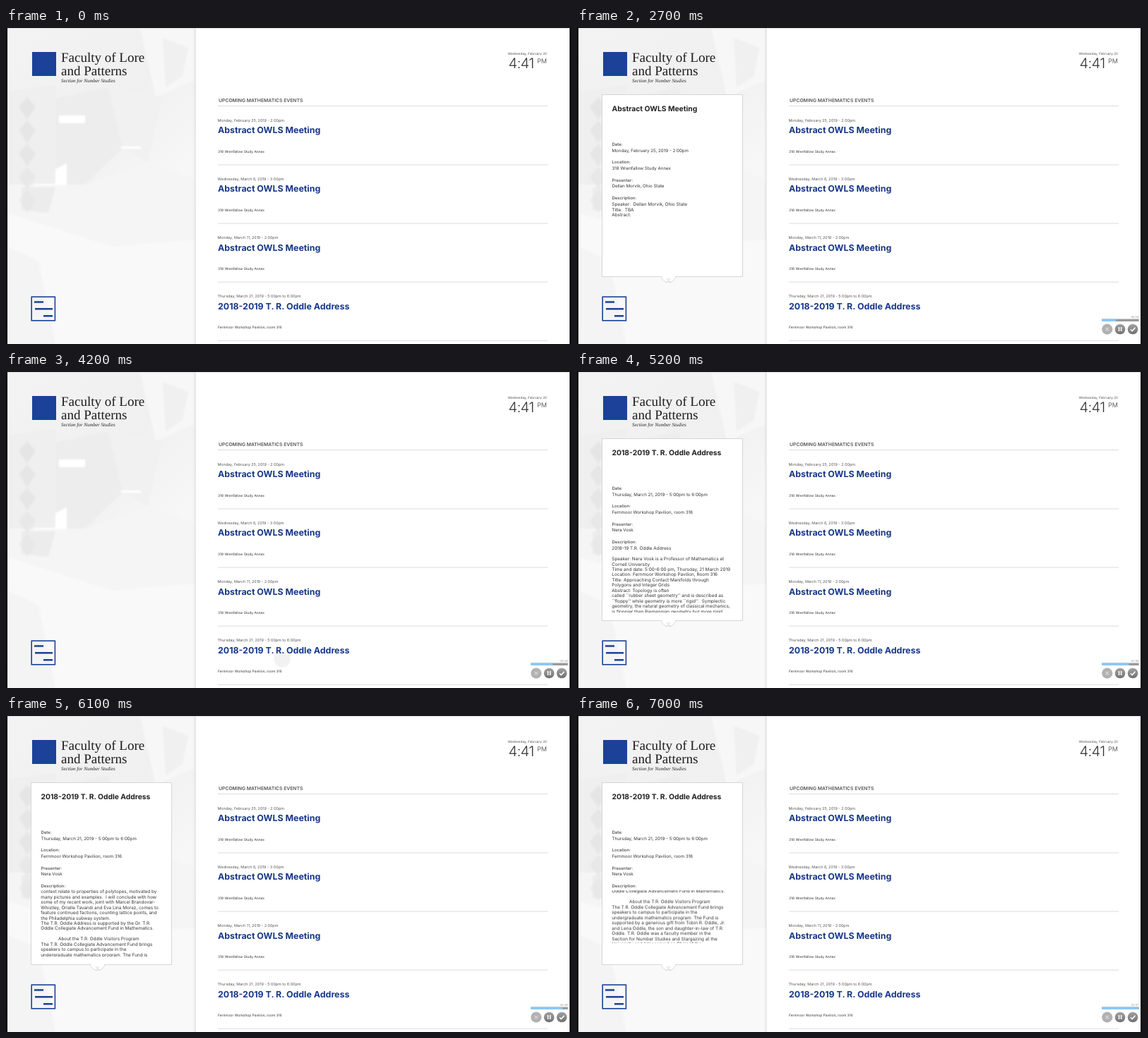
An HTML page for the animation above (7100 ms loop, 800 px wide and 448 px high).

```html
<!DOCTYPE html>
<html lang="en">
<head>
<meta charset="utf-8">
<title>Events board</title>
<style>
html, body { margin: 0; width: 100%; height: 100%; overflow: hidden; background: #000; }
svg { display: block; width: 100vw; height: 100vh; }
text { font-family: Inter, "Open Sans", sans-serif; white-space: pre; fill: #333; text-rendering: geometricPrecision; }
.brand { font: 19px "Liberation Serif", serif; fill: #1d1d1d; }
.unit { font: italic 7px "Liberation Serif", serif; fill: #222; }
.date { font-size: 5.4px; fill: #555; }
.event { font-size: 12.4px; font-weight: 700; fill: #16388a; }
.place { font-size: 4.9px; }
.head { font-size: 10.3px; font-weight: 700; fill: #222; }
.label { font-size: 6px; font-weight: 500; fill: #444; }
.value { font-size: 6.2px; }
.body { font-size: 6.4px; }

.card, .scroll, .fill, .secs, .controls, .tap { animation: 7100ms linear infinite; }
.first { animation-name: first; }
.second { animation-name: second; }
.scroll { animation-name: scroll; }
.fill { animation-name: fill; transform-origin: 743px 0; }
.secs { animation-name: secs; animation-timing-function: step-end; }
.controls { animation-name: controls; animation-timing-function: step-end; }
.tap { animation-name: tap; }
.card { animation-timing-function: cubic-bezier(.37, 0, .63, 1); }

@keyframes first {
  0%, 15.35% { transform: translateX(233px); }
  21%, 42.25% { transform: none; }
  47.89%, 100% { transform: translateX(233px); }
}
@keyframes second {
  0%, 61.97% { transform: translateX(233px); }
  67.6%, 100% { transform: none; }
}
@keyframes scroll {
  0%, 74.6% { transform: translateY(0); animation-timing-function: ease-out; }
  84.5%, 87.3% { transform: translateY(-135.1px); animation-timing-function: ease-out; }
  97.2%, 100% { transform: translateY(-187.7px); }
}
@keyframes fill { from { transform: scaleX(0); } to { transform: scaleX(1); } }
@keyframes secs {
  0% { transform: none; }
  14.085% { transform: translateY(-10px); }
  28.169% { transform: translateY(-20px); }
  42.254% { transform: translateY(-30px); }
  56.338% { transform: translateY(-40px); }
  70.423% { transform: translateY(-50px); }
  84.507% { transform: translateY(-60px); }
  98.592%, 100% { transform: translateY(-70px); }
}
@keyframes controls { 0% { opacity: 0; } 1.408%, 100% { opacity: 1; } }
@keyframes tap {
  0%, 57% { opacity: 0; }
  58.5%, 60% { opacity: 1; }
  62%, 100% { opacity: 0; }
}
</style>
</head>
<body>
<svg viewBox="0 0 800 448" preserveAspectRatio="none">
  <defs>
    <linearGradient id="wall" x2=".6" y2="1">
      <stop offset="0" stop-color="#f3f3f3"/>
      <stop offset=".45" stop-color="#f0f0f0"/>
      <stop offset=".75" stop-color="#f7f7f7"/>
      <stop offset="1" stop-color="#f6f6f6"/>
    </linearGradient>
    <linearGradient id="edge">
      <stop offset="0" stop-color="#000" stop-opacity="0"/>
      <stop offset="1" stop-color="#000" stop-opacity=".04"/>
    </linearGradient>
    <linearGradient id="knob" x2="0" y2="1">
      <stop offset="0" stop-color="#a2a2a2"/>
      <stop offset="1" stop-color="#707070"/>
    </linearGradient>
    <filter id="soft"><feGaussianBlur stdDeviation="1"/></filter>
    <clipPath id="left"><rect x="2" width="266" height="448"/></clipPath>
    <clipPath id="view"><rect x="40" y="246.3" width="190" height="94.7"/></clipPath>
    <clipPath id="sheet"><rect x="40" y="240" width="190" height="269.7"/></clipPath>
    <clipPath id="tick"><rect x="780" y="405" width="18" height="6.5"/></clipPath>
  </defs>

  <rect x="2" width="796" height="448" fill="#fff"/>
  <g clip-path="url(#left)">
    <rect x="2" width="266" height="448" fill="url(#wall)"/>
    <g filter="url(#soft)">
      <path d="M2 90L70 80V222H2Z" fill="#efefef"/>
      <path d="M70 100L145 84 165 170 112 222H70Z" fill="#ededed"/>
      <path d="M145 84L222 96 200 190 165 170Z" fill="#f1f1f1"/>
      <path d="M190 0H268V74L212 98Z" fill="#f7f7f7"/>
      <path d="M222 14L258 28 250 68 226 84Z" fill="#f0f0f0"/>
      <path d="M2 222H112L200 190 268 214V300L150 310 2 262Z" fill="#f5f5f5"/>
      <path d="M2 262L150 310 268 300V448H2Z" fill="#f9f9f9"/>
      <path d="M22 226H70L60 262 22 258Z" fill="#ececec"/>
      <path d="M2 310L46 330 70 448H2Z" fill="#f4f4f4"/>
      <path d="M75 124H112V135H75ZM163 168H191V171H163ZM40 221H86V223H40ZM70 200L86 192V221H70Z" fill="#fff"/>
      <g id="gems" fill="#e3e3e3"/>
    </g>
    <rect x="2" width="266" height="1" fill="#dcdcdc"/>
  </g>

  <rect x="37" y="34" width="34" height="34" fill="#1b4298"/>
  <text class="brand" x="78" y="47.5">Faculty of Lore</text>
  <text class="brand" x="78" y="66.5">and Patterns</text>
  <text class="unit" x="78" y="76.5">Section for Number Studies</text>

  <g fill="none" stroke="#1b4298">
    <rect x="36.2" y="381.2" width="33.2" height="33.6" stroke-width="1.6"/>
    <path d="M40 388.5H53M41 398.3H66M53 408.3H66" stroke-width="2.4"/>
  </g>

  <g clip-path="url(#left)">
    <g id="first" class="card first"></g>
    <g id="second" class="card second"></g>
  </g>

  <rect x="264" width="4" height="448" fill="url(#edge)"/>
  <rect x="268" width="530" height="448" fill="#fff"/>
  <rect x="267.5" width="1" height="448" fill="#d9d9d9"/>
  <rect x="268" width="530" height="1" fill="#e4e4e4"/>
  <circle class="tap" cx="391" cy="407" r="11.5" fill="#f2f2f2"/>
  <g id="events"></g>

  <text x="766" y="38.3" font-size="4.7" text-anchor="end" style="fill:#555">Wednesday, February 20</text>
  <text x="711.5" y="57" font-size="20" font-weight="300" letter-spacing="-.6">4:41</text>
  <text x="752" y="49.5" font-size="9" font-weight="300">PM</text>

  <g class="controls">
    <rect x="743" y="412.5" width="52.5" height="3.5" fill="#9b9b9b"/>
    <rect class="fill" x="743" y="412.5" width="52.5" height="3.5" fill="#8cc8f2"/>
    <g clip-path="url(#tick)"><g id="secs" class="secs"></g></g>
    <circle cx="750.7" cy="427" r="7.6" fill="#b1b1b1"/>
    <circle cx="769" cy="427" r="7.3" fill="url(#knob)"/>
    <circle cx="787" cy="427" r="7.3" fill="url(#knob)"/>
    <g fill="none" stroke="#fff" stroke-width="1.6">
      <path d="M748.4 424.7L753 429.3M753 424.7L748.4 429.3" stroke="#d2d2d2"/>
      <path d="M767.4 424V430M770.6 424V430"/>
      <path d="M783.8 427.2L786.1 429.5 790.4 424.7"/>
    </g>
  </g>

  <path d="M0 0H2V448H0ZM798 0H800V448H798Z" fill="#000"/>
</svg>

<script>
const $ = id => document.getElementById(id);
const text = (cls, x, y, s) => `<text class="${cls}" x="${x}" y="${y}">${s}</text>`;
const fillIn = (id, parts) => { $(id).innerHTML = parts.join(""); };

const meeting = "Abstract OWLS Meeting", address = "2018-2019 T. R. Oddle Address";
const annex = "318 Wrenfallow Study Annex", hall = "Fernmoor Workshop Pavilion, room 316";
const events = [
  ["Monday, February 25, 2019 - 2:00pm", meeting, annex],
  ["Wednesday, March 6, 2019 - 3:00pm", meeting, annex],
  ["Monday, March 11, 2019 - 2:00pm", meeting, annex],
  ["Thursday, March 21, 2019 - 5:00pm to 6:00pm", address, hall]
];

const rule = y => `<rect x="300" y="${y}" width="467" height="1" fill="#dcdcdc"/>`;
fillIn("events", [
  `<text x="301" y="105.2" font-size="6.8" font-weight="600" style="fill:#555">UPCOMING MATHEMATICS EVENTS</text>`,
  rule(110),
  ...events.map(([date, title, place], i) => {
    const y = 83.1 * i;
    return text("date", 299.5, 133 + y, date) + text("event", 300, 149.3 + y, title) +
      text("place", 300, 176.6 + y, place) + rule(193.5 + y);
  })
]);

function card(id, [date, title, place], presenter, lines, cls = "") {
  const fields = [["Date", date, 167], ["Location", place, 192.3], ["Presenter", presenter, 217.7]];
  fillIn(id, [
    `<rect x="35.5" y="94.5" width="199" height="258" fill="#fff" stroke="#d6d6d6"/>`,
    `<path d="M119 352A10.7 10.7 0 0 0 140 352" fill="#fff" stroke="#d6d6d6"/>`,
    `<path d="M127 355L132 360M132 355L127 360" stroke="#bbb" stroke-width=".6"/>`,
    text("head", 49.5, 118, title),
    ...fields.map(([name, value, y]) => text("label", 49.5, y, name + ":") + text("value", 49.5, y + 8.5, value)),
    text("label", 49.5, 243.2, "Description:"),
    `<g clip-path="url(#view)"><g class="${cls}"><g clip-path="url(#sheet)">`,
    ...lines.map((s, i) => text("body", s.startsWith("About") ? 74 : 49.3, 252.2 + 7.45 * i, s)),
    `</g></g></g>`
  ]);
}

card("first", events[0], "Dellan Morvik, Ohio State",
  ["Speaker:  Dellan Morvik, Ohio State", "Title:  TBA", "Abstract:"]);

card("second", events[3], "Nera Vosk", `2018-19 T.R. Oddle Address

Speaker: Nera Vosk is a Professor of Mathematics at
Cornell University
Time and date: 5:00-6:00 pm, Thursday, 21 March 2019
Location: Fernmoor Workshop Pavilion, Room 316
Title: Approaching Contact Manifolds through
Polygons and Integer Grids
Abstract: Topology is often
called \`\`rubber sheet geometry'' and is described as
\`\`floppy'' while geometry is more \`\`rigid''.  Symplectic
geometry, the natural geometry of classical mechanics,
is floppier than Riemannian geometry but more rigid
than topology. When a space has enough symmetry,
it can be described by a polytope, and many questions
become combinatorial. I will give an introduction to
this subject, and I will explain how geometric
questions about rigidity and embeddings in this
context relate to properties of polytopes, motivated by
many pictures and examples.  I will conclude with how
some of my recent work, joint with Marcel Brandovar-
Whistley, Orielle Tavandi and Eva Lina Morez, comes to
feature continued factions, counting lattice points, and
the Philadelphia subway system.
The T.R. Oddle Address is supported by the Dr. T.R.
Oddle Collegiate Advancement Fund in Mathematics.

About the T.R. Oddle Visitors Program
The T.R. Oddle Collegiate Advancement Fund brings
speakers to campus to participate in the
undergraduate mathematics program. The Fund is
supported by a generous gift from Tobin R. Oddle, Jr.
and Lena Oddle, the son and daughter-in-law of T.R.
Oddle. T.R. Oddle was a faculty member in the
Section for Number Studies and Stargazing at the
University and later served as Chair of the`.split("\n"), "scroll");

fillIn("secs", Array.from({ length: 8 }, (_, i) =>
  `<text x="795.3" y="${410.5 + 10 * i}" font-size="3.8" text-anchor="end" style="fill:#888">00:0${i}</text>`));

fillIn("gems", Array.from({ length: 5 }, (_, i) =>
  `<path d="M30 ${98 + 33 * i}l12 14-12 18-12-18z" opacity="${0.9 - 0.1 * i}"/>`));
</script>
</body>
</html>
```
